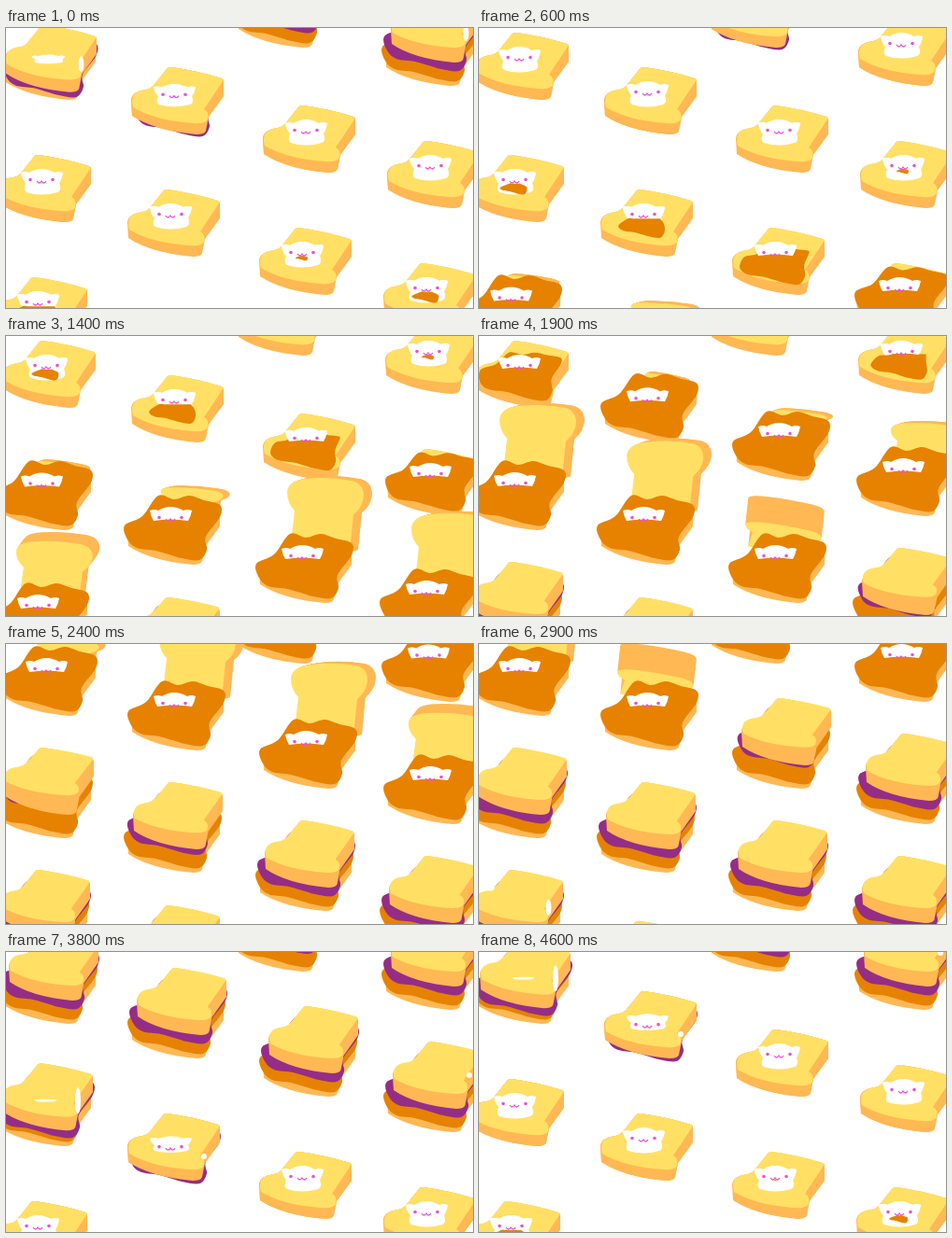
An HTML page with a canvas for the animation above (4.7 s loop, 500x300 px).

```html
<!DOCTYPE html>
<html lang="en">
<head>
<meta charset="utf-8">
<title>Sandwich loop</title>
<style>
html, body { margin: 0; width: 500px; height: 300px; overflow: hidden; background: #fff; }
canvas { display: block; }
</style>
</head>
<body>
<canvas id="stage" width="500" height="300"></canvas>
<script>
const ctx = document.getElementById('stage').getContext('2d');
const LOOP = 4700, STEP = 100, LAG = 200;
const YELLOW = '#ffe064', CRUST = '#ffb853', BUTTER = '#e68200', JAM = '#952d86', PINK = '#ee4fd6', WHITE = '#fff';

const points = text => text.split(' ').map(p => p.split(',').map(Number));

// Sandwich positions, in order of phase and of stacking
const spots = points('248,-51 406,-10 -3,5 134,42 275,83 408,121 -8,136 130,173 271,214 404,252 -12,267 127,305');

const loaf = new Path2D('M38,2Q39,0 43,0Q72,4 97,12Q99,13 99,15L99,31L83,53L80,68Q79,72 70,72Q25,68 1,52L0,36Q0,26 16,24Q22,23 26,17Z');
const crumb = new Path2D('M38,2Q39,0 43,0Q72,4 97,12Q99,13 98,15L78,45Q84,48 82,56Q80,61 66,60Q25,57 2,43Q-3,26 16,24Q22,23 26,17Z');
const slice = new Path2D('M33,18L38,-26Q30,-34 30,-46Q31,-59 52,-61Q75,-64 100,-60Q112,-57 112,-44Q111,-32 101,-24L97,16Z');
const head = new Path2D('M24,19Q29,17 33,19Q46,11 60,19Q64,17 69,19Q68,26 65,30Q68,38 63,40Q46,45 30,40Q26,38 29,30Q25,26 24,19Z');
const crown = new Path2D('M24,19Q29,17 33,19Q46,11 60,19Q64,17 69,19Q68,25 65,30Q46,27 28,30Q25,25 24,19Z');
const mouth = new Path2D('M41,28q2.5,4 5,0q2.5,4 5,0');
const cover = points('33,-2 50,2 66,-2 82,3 99,8 99,21 84,42 85,56 77,67 58,65 44,61 30,57 10,54 0,45 -3,30 16,20');

const ramp = (v, from, to) => Math.min(1, Math.max(0, (v - from) / (to - from)));
function smooth(v, from, to) {
  const k = ramp(v, from, to);
  return k * k * (3 - 2 * k);
}

function fill(path, color) {
  ctx.fillStyle = color;
  ctx.fill(path);
}

function group(draw) {
  ctx.save();
  draw();
  ctx.restore();
}

// Smooth closed curve through the points
function blob(pts, color) {
  const n = pts.length, get = i => pts[(i + n) % n];
  const path = new Path2D();
  path.moveTo(...pts[0]);
  for (let i = 0; i < n; i++) {
    const [a, b, c, d] = [get(i - 1), get(i), get(i + 1), get(i + 2)];
    path.bezierCurveTo(b[0] + (c[0] - a[0]) / 6, b[1] + (c[1] - a[1]) / 6,
      c[0] - (d[0] - b[0]) / 6, c[1] - (d[1] - b[1]) / 6, c[0], c[1]);
  }
  fill(path, color);
}

function oval(x, y, rx, ry, color) {
  const path = new Path2D();
  path.ellipse(x, y, rx, ry, 0, 0, 7);
  fill(path, color);
}

function scaleAbout(x, y, sx, sy = sx) {
  ctx.translate(x, y);
  ctx.scale(sx, sy);
  ctx.translate(-x, -y);
}

function bread(tilt = 1) {
  fill(loaf, CRUST);
  group(() => {
    ctx.scale(1, tilt);
    fill(crumb, YELLOW);
  });
}

function face() {
  oval(34, 26.5, 1.8, 1.8, PINK);
  oval(58, 26.5, 1.8, 1.8, PINK);
  ctx.strokeStyle = PINK;
  ctx.lineWidth = 1.3;
  ctx.stroke(mouth);
}

// Flows down and sideways from the mouth first, then up over the bread
function butter(v) {
  const out = .1 * ramp(v, 50, 200) + .9 * smooth(v, 50, 1100);
  const up = smooth(v, 600, 1150);
  const base = 30 + 2 * ramp(v, 200, 800);
  blob(cover.map(([x, y]) => y < 32
    ? [46 + (x - 46) * out * out, base + (y - 32) * up]
    : [46 + (x - 46) * out, base + (y - 32) * out]), BUTTER);
}

// Rises behind the bread, stands, then tips forward
function foldingSlice(v) {
  const rise = ramp(v, 1050, 1600), fold = ramp(v, 1800, 2100), tip = fold ** 3;
  const sx = .5 + .5 * rise;
  const sy = (.2 + .8 * rise ** 4) * (1 - .64 * tip);
  const slope = .12 * (1 - ramp(v, 1050, 1800)) + .17 * tip;
  const layer = (k, color) => group(() => {
    ctx.translate(60 - 16 * fold * fold + (4 + 5 * rise - 6 * tip) * k, 15 - (2 + 26 * tip) * k);
    ctx.transform(sx, slope, 0, sy, 0, 0);
    ctx.translate(-60, -15);
    fill(slice, color);
  });
  for (let i = 12; i > 0; i--) layer(i / 12, CRUST);
  layer(0, YELLOW);
}

function lid(v, lift) {
  ctx.translate(6 * lift, -25 * lift);
  group(() => {
    ctx.scale(1 - .03 * lift, 1);
    bread(1 - .07 * lift - .08 * (1 - ramp(v, 2200, 2500)));
  });
  if (v <= 3500) return;
  const grow = smooth(v, 3500, 4000);
  group(() => {
    scaleAbout(46, 41, Math.min(1, .3 + (v - 3500) / 400), grow);
    fill(head, WHITE);
  });
  if (v > 3750) {
    ctx.translate(0, (1 - grow) * 26);
    face();
  }
}

function melt(v) {
  const fall = ramp(v, 3400, 3800), left = (v - 3500) / 100;
  oval(88 - 6 * fall, 11 + 35 * fall ** 1.5, 3, 3 + 11 * Math.sin(fall * Math.PI) ** 2, WHITE);
  if (left >= 0 && left < 2) oval(24 - 8 * left, -6 + 8 * left, 4.5, 3.5, WHITE);
}

function openSandwich(v) {
  if (v > 1050) foldingSlice(v);
  bread();
  fill(head, WHITE);
  if (v > 50) butter(v);
  ctx.translate(0, -5 * smooth(v, 1000, 1250));
  fill(crown, WHITE);
  face();
}

function closedSandwich(v) {
  const lift = 1 - ramp(v, 3500, 3800);
  bread();
  if (v < 3800) group(() => {
    scaleAbout(45, 35, 1 - .3 * ramp(v, 3600, 3800));
    butter(v);
  });
  if (v < 4000) group(() => {
    const squeeze = ramp(v, 2200, 2500);
    ctx.translate(2, -18 + 7 * squeeze + 21 * (1 - lift));
    scaleAbout(50, 35, .9 + .1 * squeeze - .12 * ramp(v, 3600, 4000));
    blob(cover, JAM);
  });
  group(() => lid(v, lift));
  if (v >= 3400 && v < 3900) melt(v);
}

function draw(now) {
  const t = Math.floor(now % LOOP / STEP) * STEP;
  ctx.fillStyle = WHITE;
  ctx.fillRect(0, 0, 500, 300);
  spots.forEach(([x, y], i) => group(() => {
    const v = (t + LOOP - 1400 + LAG * i) % LOOP;
    ctx.translate(x, y);
    if (v < 2200) openSandwich(v);
    else closedSandwich(v);
  }));
}

const start = performance.now();
function tick() {
  draw(performance.now() - start);
  requestAnimationFrame(tick);
}
tick();
</script>
</body>
</html>
```
